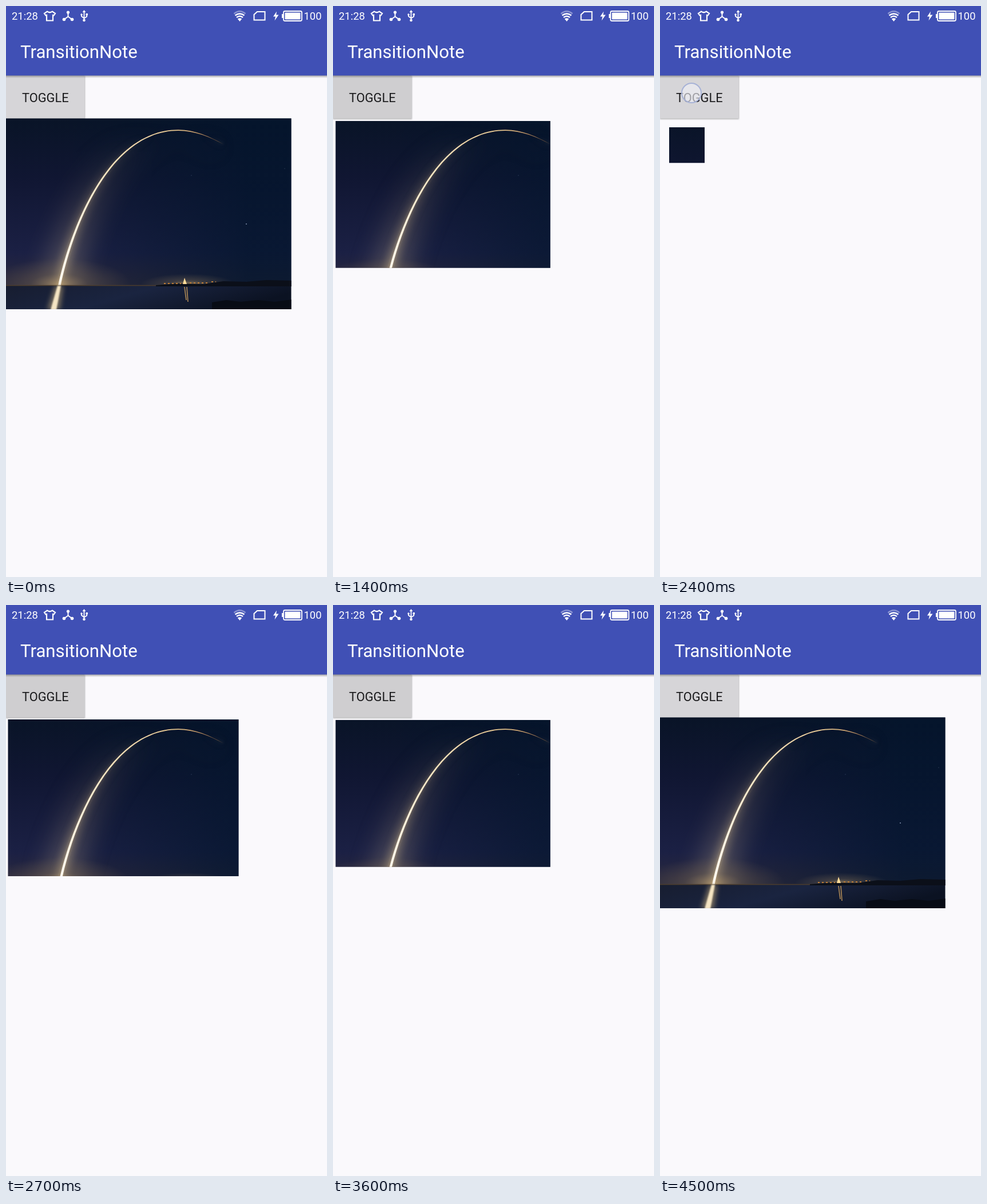
These frames come from a looping animation (561 by 998 pixels, 4.6 s). An HTML page:

```html
<!DOCTYPE html>
<html lang="en">
<head>
<meta charset="utf-8">
<title>Transition</title>
<style>
  html, body { margin: 0; width: 100%; height: 100%; overflow: hidden; background: #faf9fc; }
  svg { display: block; width: 561px; height: 998px; font-family: Roboto, sans-serif; }
</style>
</head>
<body>
<svg viewBox="0 0 561 998">
  <defs>
    <clipPath id="window"><rect id="clip"/></clipPath>
    <linearGradient id="sky" x2="0" y2="1">
      <stop offset="0" stop-color="#091427"/>
      <stop offset=".35" stop-color="#101632"/>
      <stop offset=".8" stop-color="#1b2044"/>
      <stop offset="1" stop-color="#2b293b"/>
    </linearGradient>
    <linearGradient id="east">
      <stop offset=".2" stop-color="#03152d" stop-opacity="0"/>
      <stop offset=".85" stop-color="#03152d" stop-opacity=".75"/>
    </linearGradient>
    <linearGradient id="water" x2="1" y2=".3">
      <stop offset="0" stop-color="#171d30"/>
      <stop offset=".5" stop-color="#1a2440"/>
      <stop offset="1" stop-color="#0b1222"/>
    </linearGradient>
    <linearGradient id="trail" gradientUnits="userSpaceOnUse" x1="93" x2="380" y1="0" y2="0">
      <stop offset="0" stop-color="#fffaf0"/>
      <stop offset=".3" stop-color="#fbe6c0"/>
      <stop offset=".7" stop-color="#e6c58e"/>
      <stop offset="1" stop-color="#9a633c"/>
    </linearGradient>
    <linearGradient id="haze" gradientUnits="userSpaceOnUse" x1="0" x2="0" y1="225" y2="488">
      <stop offset="0" stop-color="#8c7c69" stop-opacity="0"/>
      <stop offset=".45" stop-color="#8c7c69" stop-opacity=".45"/>
      <stop offset="1" stop-color="#b5a488" stop-opacity=".9"/>
    </linearGradient>
    <radialGradient id="warm">
      <stop offset="0" stop-color="#c9a973" stop-opacity=".65"/>
      <stop offset=".4" stop-color="#8a7659" stop-opacity=".3"/>
      <stop offset="1" stop-color="#8a7659" stop-opacity="0"/>
    </radialGradient>
    <radialGradient id="halo">
      <stop offset=".7" stop-color="#8c98de" stop-opacity=".75"/>
      <stop offset="1" stop-color="#8c98de" stop-opacity="0"/>
    </radialGradient>
    <linearGradient id="shade" x2="0" y2="1">
      <stop offset="0" stop-color="#555" stop-opacity=".55"/>
      <stop offset="1" stop-color="#555" stop-opacity="0"/>
    </linearGradient>
    <path id="arc" d="M93 488C118 375 184 217 301 217C330 217 356 228 380 241"/>
  </defs>

  <rect width="561" height="998" fill="#faf9fc"/>

  <!-- button -->
  <rect y="122" width="138" height="76" fill="#777" opacity=".5" style="filter:blur(1.2px)"/>
  <rect id="button" y="121" width="137" height="75.5"/>
  <text x="28" y="168" font-size="21.8" fill="#1b1b1d">TOGGLE</text>

  <!-- night launch -->
  <g clip-path="url(#window)">
    <rect y="196" width="499" height="294" fill="url(#sky)"/>
    <rect y="196" width="499" height="294" fill="url(#east)"/>
    <g fill="none" stroke="url(#haze)">
      <use href="#arc" stroke-width="54" opacity=".5" style="filter:blur(22px)"/>
      <use href="#arc" stroke-width="16" opacity=".75" style="filter:blur(7px)"/>
      <use href="#arc" stroke-width="6" style="filter:blur(2px)"/>
    </g>
    <ellipse cx="93" cy="486" rx="125" ry="45" fill="url(#warm)"/>
    <ellipse cx="318" cy="486" rx="82" ry="18" fill="url(#warm)"/>
    <path fill="url(#trail)" d="M91 489C116.500 375 183 216.200 301 216.200C330 216.200 356 228 380 241.500C356 229 330 218 301 218C185 218 119.500 376 95.500 489Z"/>
    <g fill="#8fa0bd">
      <circle cx="420" cy="381" r=".9"/>
      <circle cx="324" cy="296" r=".6" opacity=".5"/>
      <circle cx="487" cy="284" r=".6" opacity=".5"/>
    </g>
    <rect y="489" width="499" height="42" fill="url(#water)"/>
    <path d="M0 488.500H270" stroke="#4b3c2c" stroke-width="1.500"/>
    <path d="M262 488L300 485L345 486L380 481L420 482L455 479L499 480V490L262 490Z" fill="#0b0f19"/>
    <path d="M276 485h30M321 484h34M359 482h8" stroke="#bd7c36" stroke-width="2" stroke-dasharray="3 4"/>
    <path d="M309 486L312 475L316 486Z" fill="#ffdc98"/>
    <path d="M312 491L315 514M316 491L318 517" stroke="#c69a5c" stroke-width="1.800" opacity=".8"/>
    <path d="M86 489H100L94 531H72Z" fill="#aa9670" opacity=".65" style="filter:blur(4px)"/>
    <path d="M90 489H96L88 531H78Z" fill="#f5e5c3" style="filter:blur(1px)"/>
    <path d="M360 531V518L385 514L410 517L440 514L470 517L499 513V531Z" fill="#080c15"/>
  </g>

  <!-- bars -->
  <rect y="121" width="561" height="5" fill="url(#shade)"/>
  <rect width="561" height="121.500" fill="#4050b5"/>
  <g fill="#fff">
    <text x="25" y="90.500" font-size="31.170">TransitionNote</text>
    <text x="10" y="23.500" font-size="18.400">21:28</text>
    <text x="520.500" y="23.500" font-size="18.400">100</text>
    <circle cx="108.500" cy="11" r="2.600"/>
    <circle cx="101.500" cy="23.500" r="2.800"/>
    <circle cx="115.500" cy="23.500" r="2.800"/>
    <path d="M136.500 7l3 4h-6z"/>
    <circle cx="136.500" cy="25" r="2.300"/>
    <circle cx="132" cy="15" r="1.700"/>
    <rect x="139.500" y="13" width="3.400" height="3.400"/>
    <path d="M473 9.500L467 18.500H471L469.500 25.500L476.500 15.500H472.200Z"/>
    <rect x="482" y="14" width="3" height="7"/>
    <rect x="487.500" y="11.500" width="27" height="12" rx="1"/>
    <path d="M404.800 22.500L408.500 27L412.200 22.500Q408.500 20 404.800 22.500Z"/>
    <path id="arrow" d="M416.700 20v3.500h-2.200l3.300 4 3.300-4h-2.200V20z"/>
  </g>
  <g fill="none" stroke="#fff" stroke-width="2">
    <path stroke-width="2.200" d="M72 9.500Q76.500 13 81 9.500L86 13L83.500 16.500L82 16V25.500H71V16L69.500 16.500L67 13Z"/>
    <path d="M108.500 11V18.500L101.500 23.500M108.500 18.500L115.500 23.500"/>
    <path stroke-width="1.800" d="M136.500 9V25M132 15V18L136.500 21.500M141.200 16V18.500L136.500 21.500"/>
    <path stroke-width="2.400" opacity=".4" d="M398.500 13.500Q408.500 5 418.500 13.500"/>
    <path stroke-width="2.400" d="M400.500 16.500Q408.500 10.500 416.500 16.500M403 20Q408.500 15.500 414 20"/>
    <path d="M439 10H452.500V24.500H433.500V15Z"/>
    <rect x="485" y="9" width="32" height="17" rx="2.500" stroke-width="1.800"/>
  </g>

  <!-- finger -->
  <g id="touch">
    <circle id="glow" r="23" fill="url(#halo)"/>
    <circle id="dot" r="17" fill="#f1f1f7" stroke="#a7b2d6" stroke-width="2"/>
  </g>
</svg>
<script>
const $ = id => document.getElementById(id);
const set = (el, attrs) => { for (const k in attrs) el.setAttribute(k, attrs[k]); };

const LOOP = 4600, STEP = 100, DELAY = 93, DURATION = 300;
const taps = [
  { at: 1200, hold: 400, x: 59, y: 134, alpha: .92, grow: false },
  { at: 2400, hold: 500, x: 55, y: 152, alpha: .62, grow: true },
  { at: 3400, hold: 400, x: 53.5, y: 158, alpha: .62, grow: false },
  { at: 4100, hold: 400, x: 52.5, y: 155, alpha: .62, grow: true }
];

const ease = u => .5 - .5 * Math.cos(Math.PI * Math.min(1, Math.max(0, u)));
const mix = (a, b, p) => a + (b - a) * p;

function draw(now) {
  const t = Math.floor(now % LOOP / STEP) * STEP;
  const tap = taps.findLast(k => k.at <= t);
  const age = tap ? t - tap.at : Infinity;

  let open = 1;
  if (tap) {
    const p = ease((age - DELAY) / DURATION);
    open = tap.grow ? p : 1 - p;
  }
  const x = mix(16, 0, open), y = mix(212, 196.5, open);
  set($('clip'), { x, y, width: mix(78, 498.5, open) - x, height: mix(274.3, 530, open) - y });

  const pressed = tap && age >= STEP && age < tap.hold;
  set($('button'), { fill: pressed ? '#cfced0' : '#d6d5d8' });

  const touching = age < STEP;
  set($('touch'), { visibility: touching ? 'visible' : 'hidden' });
  if (touching) {
    set($('touch'), { transform: `translate(${tap.x} ${tap.y})` });
    set($('dot'), { 'fill-opacity': tap.alpha });
    set($('glow'), { opacity: tap.alpha > .9 ? 1 : 0 });
  }
  set($('arrow'), { opacity: t >= 1600 && t < 2400 ? 1 : 0 });
  requestAnimationFrame(() => draw(performance.now()));
}
draw(0);
</script>
</body>
</html>
```
